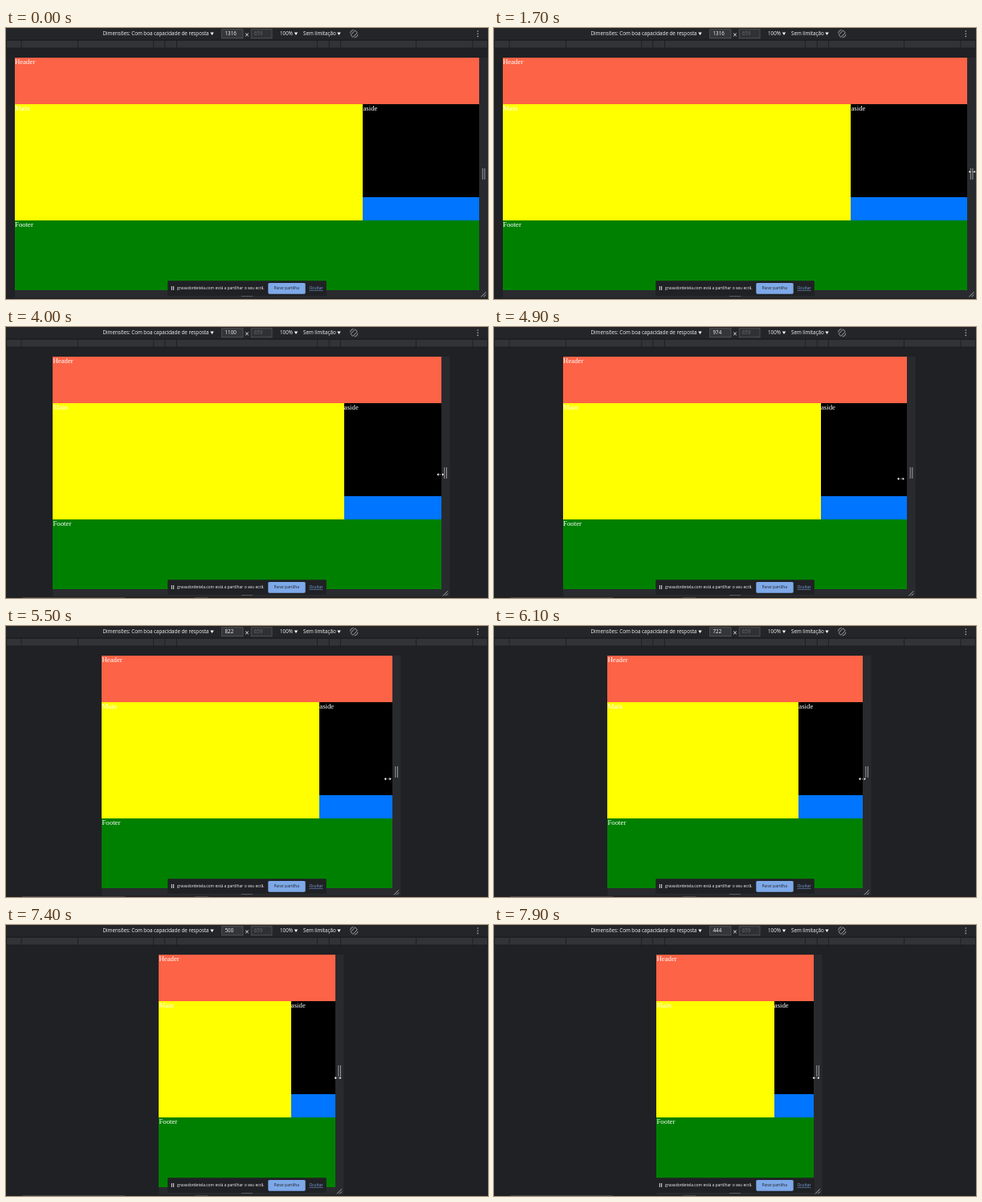
Recreate the animation shown at these times as an HTML page. Size 600 by 338 pixels, loop 8 s.

```html
<!DOCTYPE html>
<html lang="pt">
<head>
<meta charset="utf-8">
<title>Responsive layout</title>
<style>
html, body { margin: 0; width: 100%; height: 100%; overflow: hidden; background: #202124; }
svg { display: block; width: 600px; height: 338px; }
.ui { font: 6.24px "Open Sans", "Noto Sans", sans-serif; fill: #f4f5f6; }
.share { font-size: 4.96px; }
.page { font: 8.78px "Liberation Serif", "Times New Roman", serif; fill: #fff; }
.blocks { shape-rendering: crispEdges; }
</style>
</head>
<body>
<svg viewBox="0 0 600 338">
  <rect width="600" height="338" fill="#202124"/>
  <rect width="600" height="14.5" fill="#242528"/>
  <rect y="14.5" width="600" height="11" fill="#1b1c1f"/>
  <g id="ruler" fill="#323337"></g>

  <g class="ui">
    <text x="120.5" y="9.4">Dimensões: Com boa capacidade de resposta</text>
    <g stroke="#5b5d61" stroke-width=".7">
      <rect x="268.7" y="1.8" width="26.3" height="11" fill="#35363a"/>
      <rect x="305.2" y="1.8" width="25.8" height="11" fill="#303135"/>
    </g>
    <text id="size" x="272.5" y="9.4"></text>
    <path d="M298.2 6.6l3.6 3.6m0-3.6l-3.6 3.6" stroke="#f4f5f6" stroke-width=".9"/>
    <text x="308.8" y="9.4" style="fill:#696b6f">659</text>
    <text x="341" y="9.4">100%</text>
    <text x="370" y="9.4">Sem limitação</text>
    <path d="M254.3 5.6h4.4l-2.2 3.4zM358.8 5.6h4.4l-2.2 3.4zM412.3 5.6h4.4l-2.2 3.4z"/>
  </g>
  <g fill="none" stroke="#a9abaf" stroke-width=".9">
    <rect x="431.2" y="3.2" width="4" height="8" rx=".8" transform="rotate(42 433.2 7.2)"/>
    <path d="M432.6 2.3a5 5 0 0 0-4.2 4.3M433.8 12.1a5 5 0 0 0 4.2-4.3"/>
  </g>
  <g fill="#b4b6ba">
    <circle cx="587.3" cy="4" r=".8"/><circle cx="587.3" cy="7.2" r=".8"/><circle cx="587.3" cy="10.4" r=".8"/>
  </g>

  <rect id="frame" y="37" height="299.5" fill="#292a2e"/>
  <rect id="gap" y="37" height="290" fill="#1c1d20"/>
  <path d="M293 334.4h14" stroke="#6c6e72" stroke-width=".8"/>
  <g id="grips" fill="none" stroke="#a8aaae" stroke-width=".9">
    <path d="M4.3 175v14M6.9 175v14"/>
    <path d="M2.4 335.3l6-6M5.6 335.3l2.8-2.8" stroke-width="1"/>
  </g>

  <g class="blocks">
    <rect id="header" y="37" height="58" fill="#fd6346"/>
    <rect id="main" y="95" height="145" fill="#ff0"/>
    <rect id="aside" y="95" height="116" fill="#000"/>
    <rect id="rest" y="211" height="29" fill="#0075ff"/>
    <rect id="footer" y="240" height="87" fill="#008000"/>
  </g>
  <g class="page">
    <text id="headerText" y="45.2">Header</text>
    <text id="mainText" y="103.3">Main</text>
    <text id="asideText" y="103.3">aside</text>
    <text id="footerText" y="248.2">Footer</text>
  </g>

  <path id="tabs" d="M20 337.6h128M235 337.6h17" stroke="#4b4c50" stroke-width=".9"/>

  <g class="ui share">
    <rect x="201.3" y="315.3" width="197.5" height="18.7" rx="1" fill="#202124"/>
    <path d="M206.3 322v5M208.6 322v5" stroke="#f4f5f6" stroke-width=".9"/>
    <text x="213" y="326.4">gravadordetela.com está a partilhar o seu ecrã.</text>
    <rect x="326.3" y="318" width="46.4" height="13.7" rx="1.6" fill="#7ea9e9"/>
    <text x="333.4" y="326.4" style="fill:#202124">Parar partilha</text>
    <text x="377.4" y="326.4" style="fill:#7ea9e9" text-decoration="underline">Ocultar</text>
  </g>

  <g id="cursor">
    <path d="M-4.5 0l2.3-1.7v3.4zM4.5 0l-2.3-1.7v3.4z" fill="#fff" stroke="#000" stroke-width=".8" paint-order="stroke"/>
    <path d="M-2 0h4" stroke="#ddd" stroke-width=".7" stroke-dasharray=".8 .6"/>
  </g>
</svg>
<script>
const LOOP = 8000, STEP = 100, SCALE = 0.4392, MID = 300, FULL = 1316;

// Each pull of the handle: start, end, page width reached
const PULLS = [
  [2300, 3100, 1214], [3200, 3700, 1128], [3800, 4900, 974],
  [4900, 5500, 822], [5600, 6100, 722], [6100, 6500, 622],
  [6500, 6900, 574], [6900, 7500, 484], [7600, 7900, 444]
];

const el = id => document.getElementById(id);
const progress = (t, from, to) => Math.min(1, Math.max(0, (t - from) / (to - from)));
const span = (id, x, end) => {
  el(id).setAttribute("x", x);
  if (end !== undefined) el(id).setAttribute("width", end - x);
};
const move = (id, x, y) => el(id).setAttribute("transform", `translate(${x} ${y})`);
const show = (id, on) => el(id).setAttribute("visibility", on ? "visible" : "hidden");

// Breakpoint bar, mirrored about the middle
const marks = [0.5, 19, 89.5, 183.7, 197.8, 212.4];
const edges = [...marks, ...marks.map(x => 600 - x).reverse()];
el("ruler").innerHTML = edges.slice(1).map((x, i) =>
  `<rect x="${edges[i] + 0.4}" y="15.8" width="${x - edges[i] - 0.8}" height="8.8"/>`).join("");

const pageSize = t => PULLS.reduce((w, [from, to, goal]) =>
  w + (goal - w) * progress(t, from, to), FULL);

// The device frame repaints late during the first pull
const frameSize = t => pageSize(t < PULLS[1][0] ? t - 300 : t);

// The pointer drifts inside the page halfway and sinks a little on the way
function placeCursor(t, size, right) {
  const drift = 2 + size / 290 - 13.5 * Math.exp(-(((size - 930) / 200) ** 2));
  const sink = 185 - 5.8 * Math.tanh((size - 1080) / 110);
  const arrive = 119 * (1 - progress(t, 800, 1700));
  move("cursor", right + drift, sink - arrive);
  show("cursor", t >= 900);
}

function draw(t) {
  const size = pageSize(t), half = size * SCALE / 2;
  const left = Math.round(MID - half), right = Math.round(MID + half);
  const split = Math.round(MID + half / 2);
  const frame = frameSize(t), frameHalf = frame * SCALE / 2;

  span("frame", MID - frameHalf, MID + frameHalf + 11);
  span("gap", MID - frameHalf, MID + frameHalf);
  move("grips", MID + frameHalf, 0);
  for (const id of ["header", "footer"]) span(id, left, right);
  span("main", left, split);
  for (const id of ["aside", "rest"]) span(id, split, right);
  for (const id of ["headerText", "mainText", "footerText"]) span(id, MID - half);
  span("asideText", MID + half / 2);

  el("size").textContent = 2 * Math.round(frame / 2);
  placeCursor(t, size, MID + half);
  show("tabs", t >= 2000);
}

const start = performance.now();
function tick() {
  const t = (performance.now() - start) % LOOP;
  draw(Math.floor(t / STEP) * STEP);
  requestAnimationFrame(tick);
}
tick();
</script>
</body>
</html>
```
